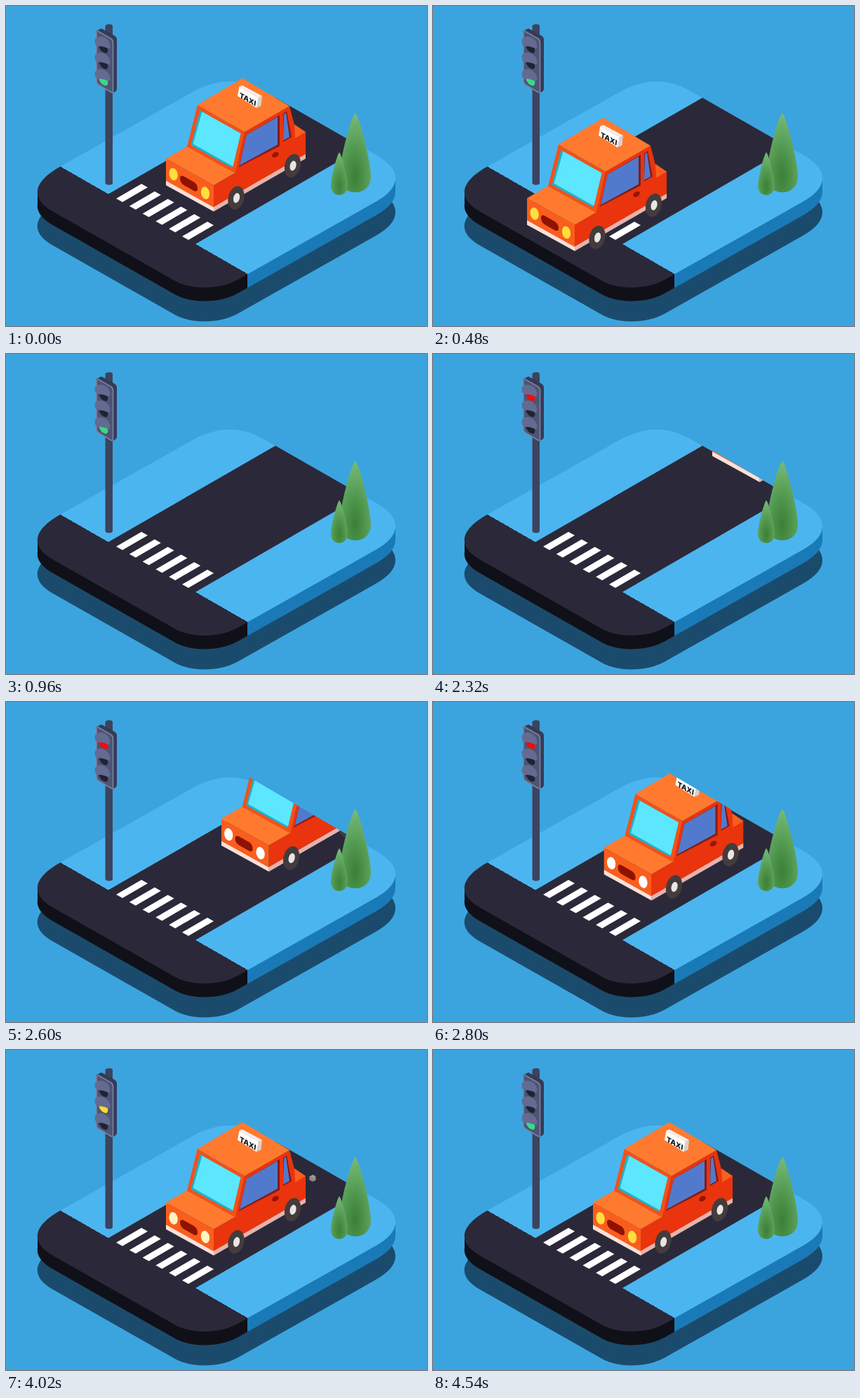
Animation, 600 px wide and 457 px high, one loop 4.74 s. Source, as an HTML page:

```html
<!DOCTYPE html>
<html lang="en">
<head>
<meta charset="utf-8">
<title>Taxi at the crossing</title>
<style>
  html, body { margin: 0; width: 100%; height: 100%; overflow: hidden; background: #3ba4df; }
  svg { display: block; width: 100vw; height: 100vh; }
  .car, .puff, .beam, .lamp { animation: 4740ms linear infinite; }
  .car { animation-name: drive; }
  .puff { animation-name: puff; }
  .beam { animation-name: beam; }
  .red { animation-name: red; }
  .amber { animation-name: amber; }
  .green { animation-name: green; }

  @keyframes drive {
    0% { transform: translate(0, 0); }
    2.11% { transform: translate(0, 0); animation-timing-function: cubic-bezier(.364, 0, .636, 1); }
    24.05% { transform: translate(-319px, 191.4px); animation-timing-function: step-end; }
    46.31% { transform: translate(182px, -118.5px); animation-timing-function: cubic-bezier(.364, 0, .636, 1); }
    62.03%, 100% { transform: translate(0, 0); }
  }
  @keyframes puff {
    0%, 62.45% { transform: scale(0); }
    67.51% { transform: scale(1.15); }
    74.26%, 84.79% { transform: scale(0); }
    84.81% { transform: scale(.42); }
    86.5%, 100% { transform: scale(0); }
  }
  @keyframes beam {
    0%, 25.3% { fill: #ffdf3f; }
    25.4%, 60.76% { fill: #fff; }
    62.45%, 71.73% { fill: #ffdf3f; }
    74.26%, 83.97% { fill: #fff; }
    86.5%, 100% { fill: #ffdf3f; }
  }
  @keyframes red {
    0%, 32.07% { fill: #1e2232; }
    35.44%, 65.82% { fill: #ff0808; }
    69.2%, 100% { fill: #1e2232; }
  }
  @keyframes amber {
    0%, 65.82% { fill: #1e2232; }
    68.35%, 90.72% { fill: #ffd92e; }
    95.78%, 100% { fill: #1e2232; }
  }
  @keyframes green {
    0%, 32.07% { fill: #37db86; }
    35.44%, 90.72% { fill: #1e2232; }
    95.78%, 100% { fill: #37db86; }
  }
</style>
</head>
<body>
<svg viewBox="0 0 600 457" preserveAspectRatio="none">
  <defs>
    <path id="slab" d="M77 229.5L262 125C300 103 334 102.6 366 121L528 213C564 233.5 564 258.5 528 279L330 391C305 405 264 406 240 392L66 293C36 276 36 252.5 77 229.5Z"/>
    <clipPath id="lane">
      <path d="M77 230L318 90.5L528 214C564 233.5 564 258.5 528 279L330 391C305 405 264 406 240 392L66 293C36 276 36 253 77 230Z"/>
    </clipPath>
    <linearGradient id="side" gradientUnits="userSpaceOnUse" x1="0" y1="0" x2="600" y2="0">
      <stop offset=".5733" stop-color="#101018"/>
      <stop offset=".5733" stop-color="#1a7ab8"/>
    </linearGradient>
    <!-- splits the slab along the near road's edge -->
    <linearGradient id="ground" gradientUnits="userSpaceOnUse" x1="364" y1="38.7" x2="57" y2="572.7">
      <stop offset=".5" stop-color="#4bb5f0"/>
      <stop offset=".5" stop-color="#2b2939"/>
    </linearGradient>
    <radialGradient id="leaf" cx=".5" cy=".8" r=".8">
      <stop offset="0" stop-color="#3c8038"/>
      <stop offset=".35" stop-color="#4c9249"/>
      <stop offset="1" stop-color="#76bb79"/>
    </radialGradient>
    <path id="stripe" d="M157 275L193 254L202 259L166 280Z"/>
    <path id="lens" d="M132 56.5Q140 55.5 145 60Q146 67 142.5 67.5Q134.5 66 132 56.5Z"/>
    <path id="visor" d="M126.5 51Q126 44 134 43.5Q145 44.5 148 54Q149.5 61.5 145.5 61Q140 57 131 57.5Q127 56.5 126.5 51Z"/>
    <g id="wheel">
      <ellipse rx="11.2" ry="17" transform="rotate(14)" fill="#443c3c"/>
      <ellipse cx=".6" rx="4.4" ry="7.2" transform="rotate(14)" fill="#e8e6e4"/>
    </g>
  </defs>

  <rect width="600" height="457" fill="#3ba4df"/>

  <!-- platform -->
  <use href="#slab" y="48.5" fill="#1b4b6c"/>
  <g fill="url(#side)">
    <use href="#slab" y="19.5"/>
    <path d="M45 263L555 246V265.5L45 282.5Z"/>
  </g>
  <use href="#slab" fill="url(#ground)"/>
  <path d="M130 277.7L384 131L508 202L254 349.3Z" fill="#2b2939"/>
  <g fill="#fff">
    <use href="#stripe"/>
    <use href="#stripe" x="18.8" y="10.8"/>
    <use href="#stripe" x="37.6" y="21.6"/>
    <use href="#stripe" x="56.4" y="32.4"/>
    <use href="#stripe" x="75.2" y="43.2"/>
    <use href="#stripe" x="94" y="54"/>
  </g>

  <!-- traffic light -->
  <path d="M141.5 28.5Q142 26 147 26Q152 26 152 28.5V252.5Q152 255.5 147 255.5Q141.5 255.5 141.5 252.5Z" fill="#3c435f"/>
  <path d="M128 36L136 32L154 42Q158 44.5 158 48V118Q158 121 155 122.5L150 125Z" fill="#353b57"/>
  <path d="M129 38.5Q129 35 132 36.5L149.5 46.5Q152.5 48.5 152.5 52V121Q152.5 125 149.5 123L132 112.5Q129 110.5 129 107Z" fill="#4d5474" stroke="#7b81a2" stroke-width="1.6"/>
  <use href="#lens" class="lamp red"/>
  <use href="#lens" class="lamp amber" y="22.8"/>
  <use href="#lens" class="lamp green" y="46.5"/>
  <g fill="#646b91">
    <use href="#visor"/>
    <use href="#visor" y="22.8"/>
    <use href="#visor" y="46.5"/>
  </g>

  <!-- taxi -->
  <g clip-path="url(#lane)">
    <g transform="translate(437 183)">
      <g class="puff" opacity=".94">
        <path d="M-11-6L2-12L11-5L-1 1Z" fill="#aea49e"/>
        <path d="M-11-6L-1 1L0 12L-11 6Z" fill="#9d938e"/>
        <path d="M-1 1L11-5L10 7L0 12Z" fill="#a69c96"/>
      </g>
    </g>
    <g class="car">
      <path d="M296 256L327 238L340 180L404 143L411 170L427 180V213L296 288Z" fill="#e9340d"/>
      <path d="M296 287L427 211.5V218L296 293.5Z" fill="#e5b4ae"/>
      <path d="M228 249L296 287V293.5L228 256Z" fill="#fde0d8"/>
      <path d="M228 218L296 256V287.5L228 249.5Z" fill="#fa5e1d"/>
      <path d="M228 218L259 200L327 238L296 256Z" fill="#ff7a2f"/>
      <path d="M273 141L340 180L327 239L258 201Z" fill="#f2511a"/>
      <path d="M276.5 149L334.5 182L322 231L263.5 199Z" fill="#20b1c8"/>
      <path d="M279.5 151L334.5 182L323.5 229L266.5 197Z" fill="#5ce7ff"/>
      <path d="M273 141L337 103L404 143L340 180Z" fill="#ff7a2f"/>
      <path d="M411 169L427 180L412 189Z" fill="#f7601f"/>
      <path d="M343 184L390 156V200L332 230Z" fill="#801c1d"/>
      <path d="M343 184L387 158.5V198L333 227.5Z" fill="#517acd"/>
      <path d="M395 154L400 150.5L407 187L395 194Z" fill="#801c1d"/>
      <path d="M396 155L399 152.5L404 187L395 192Z" fill="#517acd"/>
      <ellipse cx="384" cy="212.3" rx="5.2" ry="3.4" transform="rotate(-30 384 212.3)" fill="#981505"/>
      <path d="M248 246Q248 241 253 243L268 251.5Q273 255 273 261Q273 266 268 264L253 255.5Q248 252 248 246Z" fill="#8e1303"/>
      <g class="beam">
        <ellipse cx="238.6" cy="240.3" rx="6" ry="9" transform="rotate(-12 238.6 240.3)"/>
        <ellipse cx="284" cy="267" rx="6" ry="9" transform="rotate(-12 284 267)"/>
      </g>
      <use href="#wheel" x="328" y="274"/>
      <use href="#wheel" x="408.5" y="228"/>
      <path d="M330 128.5L332.5 115L360 131L357 145.5Z" fill="#fff"/>
      <path d="M332.5 115L337 113.5L365 128.5L360 131Z" fill="#f3eeec"/>
      <path d="M360 131L365 128.5L363.5 142.5L357 145.5Z" fill="#dacfcb"/>
      <text transform="matrix(.96 .53 -.14 1 332.6 130.5)" font-family="Inter, 'Open Sans', sans-serif" font-weight="800" font-size="10" fill="#111">TAXI</text>
    </g>
  </g>

  <!-- trees -->
  <g fill="url(#leaf)">
    <path d="M498 153C503 156 520 222 520 244C520 258 510 266 498 266C486 266 475 258 475 244C475 222 492 156 498 153Z"/>
    <path d="M475 209C478 211 487 246 487 256C487 265 481 270 475 270C468 270 463 265 463 256C463 246 472 211 475 209Z"/>
  </g>
</svg>
<script>
  // Hold every pose for 40 ms, as at 25 pictures a second.
  const loop = 4740, step = 40, late = 4020;
  const moves = document.getAnimations();
  moves.forEach(m => m.pause());

  function snap(t) {
    const base = t < late ? 0 : late;
    return base + Math.floor((t - base) / step) * step;
  }

  function draw() {
    const t = snap(performance.now() % loop);
    moves.forEach(m => { m.currentTime = t; });
    requestAnimationFrame(draw);
  }
  draw();
</script>
</body>
</html>
```
